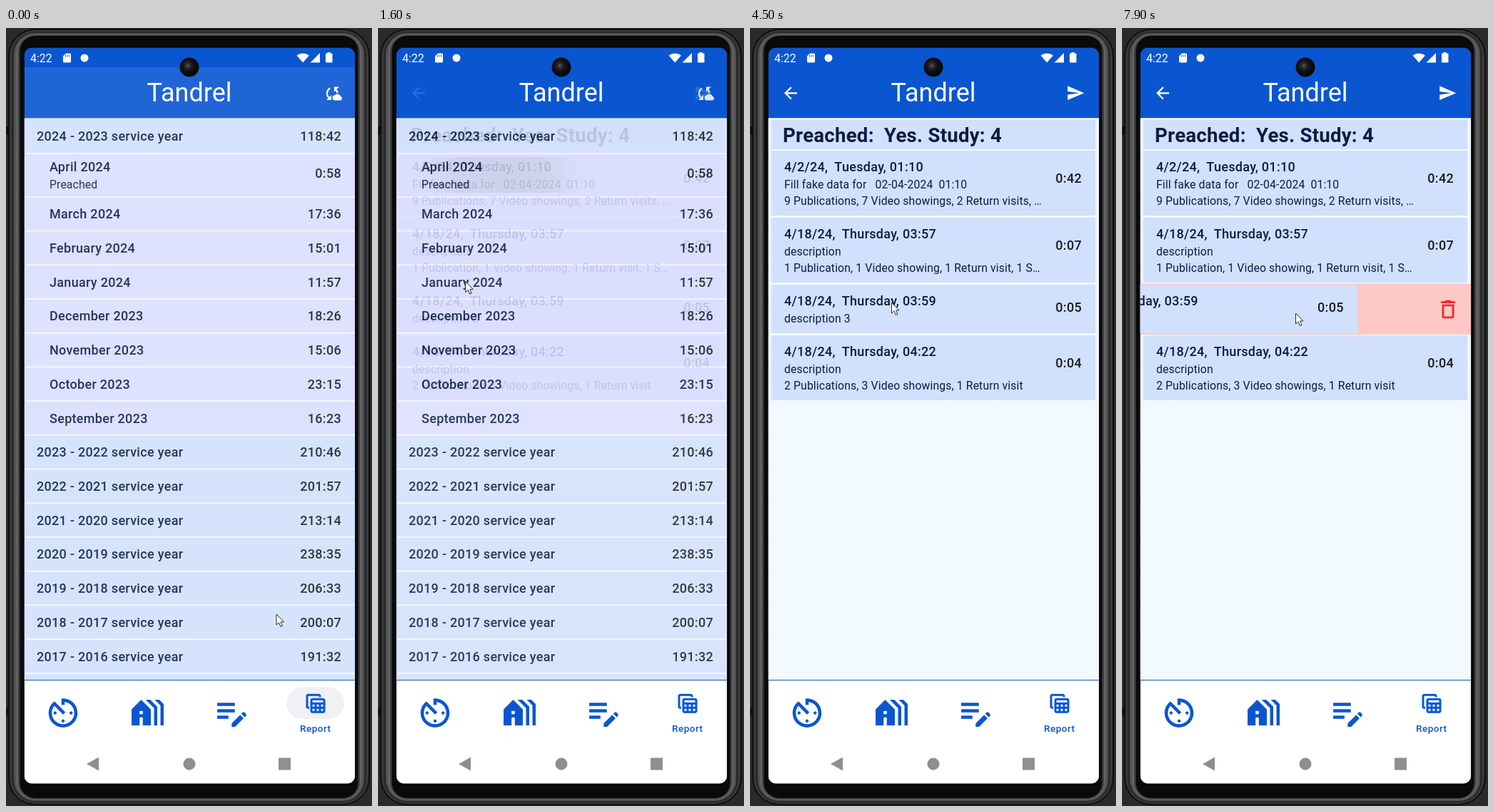
Animation of 513 by 1091 pixels, one loop 8000 ms. Source, as an HTML page:

```html
<!DOCTYPE html>
<html lang="en">
<head>
<meta charset="utf-8">
<title>Service report</title>
<style>
  html, body { margin: 0; width: 100%; height: 100%; overflow: hidden; background: #292a2c; }
  svg { display: block; width: 100vw; height: 100vh; }
  text { font-family: Roboto, sans-serif; white-space: pre; fill: #0b1b46; }
  .row { font-size: 18px; font-weight: 500; letter-spacing: .3px; }
  .num { text-anchor: end; fill: #191b22; }
  .small { font-size: 15.75px; letter-spacing: .13px; }
  .head { font-size: 27.6px; font-weight: 700; letter-spacing: .25px; }
  .white { fill: #fff; }
</style>
</head>
<body>
<svg id="stage" viewBox="0 0 513 1091" xmlns="http://www.w3.org/2000/svg"></svg>
<script>
const BLUE = '#0a56d1', PAPER = '#f2f9ff', CARD = '#d1e0fc', MONTH = '#dddeff', YEAR = '#d2e0fb';
const LOOP = 8000, STEP = 100;
const LEFT = 25.6, WIDTH = 463.6, LIST_TOP = 126.6;

const rect = (x, y, w, h, fill, more = '') =>
  `<rect x="${x}" y="${y}" width="${w}" height="${h}" fill="${fill}" ${more}/>`;
const band = (y, h, fill, more) => rect(LEFT, y, WIDTH, h, fill, more);
const text = (x, y, cls, s) => `<text x="${x}" y="${y}" class="${cls}">${s}</text>`;
const icon = (x, y, scale, fill, d, more = '') =>
  `<path transform="translate(${x} ${y}) scale(${scale})" fill="${fill}" d="${d}" ${more}/>`;

const TRASH = 'M6 19c0 1.1.9 2 2 2h8c1.1 0 2-.9 2-2V7H6v12zM8 9h8v10H8V9zm7.5-5l-1-1h-5l-1 1H5v2h14V4z';
const BACK = 'M20 11H7.83l5.59-5.59L12 4l-8 8 8 8 1.41-1.41L7.83 13H20v-2z';
const SEND = 'M2.01 21L23 12 2.01 3 2 10l15 2-15 2z';
const TIMER = 'M11 17c0 .55.45 1 1 1s1-.45 1-1-.45-1-1-1-1 .45-1 1zm0-14v4h2V5.08c3.39.49 6 3.39 6 6.92 0 3.87-3.13 7-7 7s-7-3.13-7-7c0-1.68.59-3.22 1.58-4.42L12 13l1.41-1.41-6.8-6.8v.02C4.42 6.45 3 9.05 3 12c0 4.97 4.02 9 9 9 4.97 0 9-4.03 9-9s-4.03-9-9-9h-1zm7 9c0-.55-.45-1-1-1s-1 .45-1 1 .45 1 1 1 1-.45 1-1zM6 12c0 .55.45 1 1 1s1-.45 1-1-.45-1-1-1-1 .45-1 1z';
const HOUSES = 'M18 20V8.35L13.65 4h-2.83L16 9.18V20zM22 20V6.69L19.31 4h-2.83L20 7.52V20zM8 4l-6 6v10h5v-5h2v5h5V10zM9 13H7v-2h2z';
const NOTE = 'M3 10h11v2H3v-2zm0-2h11V6H3v2zm0 8h7v-2H3v2zm15.01-3.13.71-.71a.996.996 0 0 1 1.41 0l.71.71c.39.39.39 1.02 0 1.41l-.71.71-2.12-2.12zm-.71.71-5.3 5.3V21h2.12l5.3-5.3-2.12-2.12z';
const TABLE = 'M19 7H9c-1.1 0-2 .9-2 2v10c0 1.1.9 2 2 2h10c1.1 0 2-.9 2-2V9c0-1.1-.9-2-2-2zm0 2v2H9V9h10zm-6 6v-2h2v2h-2zm2 2v2h-2v-2h2zm-4-2H9v-2h2v2zm6-2h2v2h-2v-2zm-8 4h2v2H9v-2zm8 2v-2h2v2h-2zM6 17H5c-1.1 0-2-.9-2-2V5c0-1.1.9-2 2-2h10c1.1 0 2 .9 2 2v1h-2V5H5v10h1v2z';

// Nested rounded shells: [inset x, inset y, colour], outermost first.
function phone() {
  const shells = [[3, 1, '#0f0f10'], [5, 3, '#39393a'], [8, 5, '#29292a'], [11, 7, '#525253'],
    [14, 9, '#626263'], [17, 10, '#3c3c3d'], [19.5, 11, '#0a0a0b']];
  return rect(0, 0, 513, 1091, '#292a2c') +
    rect(0, 138, 4, 12, '#111') + rect(0, 953, 4, 11, '#111') +
    shells.map(([x, y, fill]) =>
      rect(x, y, 513 - 2 * x, 1091 - 2 * y, fill, `rx="${41 - x}"`)).join('');
}

function topBar() {
  return band(27.5, 100, BLUE) +
    `<g fill="#fff">
      <text x="34" y="48" class="white" font-size="16">4:22</text>
      <path d="M84 35.5h5.5q1.5 0 1.5 1.5v10q0 1.5-1.5 1.5h-8q-1.5 0-1.5-1.5v-7.5z"/>
      <path d="M83.5 38v2.5m2.5-2.5v2.5m2.5-2.5v2.5" stroke="${BLUE}" stroke-width="1"/>
      <circle cx="110" cy="42" r="5.5"/>
      <path d="M407.5 38.5a14 14 0 0 1 17.5 0L416.2 48.5zM440 35v13.5h-13.5zM450.5 34h4v1.5h2q1 0 1 1v11q0 1-1 1h-7.5q-1 0-1-1v-11q0-1 1-1h1.5z"/>
      <text x="257" y="103" class="white" font-size="36" text-anchor="middle">Tandrel</text>
    </g>
    <g id="syncIcon" fill="#fff">
      <path d="M454 84.5a8.5 8.5 0 0 0-.5 14M460.5 85a8 8 0 0 1 4 6" fill="none" stroke="#fff" stroke-width="2.2"/>
      <path d="M449 101h7v-7zM460 82.5h7l-7 7z"/>
      <path d="M460.5 101.5a3.7 3.7 0 0 1 .3-7.3 5 5 0 0 1 8.5 1.9 2.8 2.8 0 0 1-.6 5.4z"/>
    </g>
    <g id="detailIcons">${icon(43.5, 77.8, 1.125, '#fff', BACK)}${icon(443, 78, 1.1, '#fff', SEND)}</g>`;
}

function yearList() {
  const months = ['March 2024', 'February 2024', 'January 2024', 'December 2023',
    'November 2023', 'October 2023', 'September 2023'];
  const totals = ['17:36', '15:01', '11:57', '18:26', '15:06', '23:15', '16:23',
    '210:46', '201:57', '213:14', '238:35', '206:33', '200:07', '191:32'];
  let out = band(LIST_TOP, 788, PAPER) + band(LIST_TOP, 48.4, YEAR) + band(177, 59, MONTH) +
    rect(61, 181, 229, 50, 'url(#rippleFill)', 'id="ripple"') +
    text(43, 158, 'row', '2024 - 2023 service year') + text(470, 158, 'row num', '118:42') +
    text(61, 201, 'row', 'April 2024') + text(61, 225, 'small', 'Preached') +
    text(470, 209.5, 'row num', '0:58');
  totals.forEach((total, i) => {
    const y = 237.8 + 47.72 * i, base = y + 29.4;
    const year = 2030 - i;
    out += band(y, 45.7, i < 7 ? MONTH : YEAR) +
      (i < 7 ? text(61, base, 'row', months[i])
             : text(43, base, 'row', `${year} - ${year - 1} service year`)) +
      text(470, base, 'row num', total);
  });
  return out + band(906, 8, YEAR);
}

const panel = (y, h) => rect(29.7, y, 454.6, h, CARD);

function card(y, h, title, lines, total, totalY) {
  return panel(y, h) + text(48, y + 29, 'row', title) +
    lines.map((s, i) => text(48, y + 53 + 23 * i, 'small', s)).join('') +
    text(465, totalY, 'row num', total);
}

function dayList() {
  return band(LIST_TOP, 788, PAPER) + panel(128.5, 41.5) +
    text(46, 159.5, 'head', 'Preached:  Yes. Study: 4') +
    card(172, 91, '4/2/24,  Tuesday, 01:10',
      ['Fill fake data for   02-04-2024  01:10', '9 Publications, 7 Video showings, 2 Return visits, …'], '0:42', 217) +
    card(266, 91, '4/18/24,  Thursday, 03:57',
      ['description', '1 Publication, 1 Video showing, 1 Return visit, 1 S…'], '0:07', 311) +
    `<g id="remove">${band(358.5, 71.5, '#fdc8c5')}${icon(440, 377.5, 1.42, '#ec2a2d', TRASH)}</g>
     <g id="ghostTrash">${icon(440, 377.5, 1.42, '#fff', TRASH, 'opacity=".6"')}</g>
     <g id="swipe">${card(360, 68, '4/18/24,  Thursday, 03:59', ['description 3'], '0:05', 398)}</g>` +
    card(431, 91, '4/18/24,  Thursday, 04:22',
      ['description', '2 Publications, 3 Video showings, 1 Return visit'], '0:04', 476);
}

function bottomBar() {
  return band(914, 146, '#fff') + band(914, 1, '#1a5ca8') +
    rect(393, 924, 81, 45, '#eff1f4', 'rx="22.5" id="pill"') +
    icon(53, 933.5, 2.25, BLUE, TIMER) + icon(171.5, 933, 2.25, BLUE, HOUSES) +
    icon(289.3, 932.7, 2.25, BLUE, NOTE) + icon(416, 929.3, 1.5, BLUE, TABLE) +
    `<text x="412" y="987" font-size="13.5" font-weight="500" letter-spacing=".5" style="fill:${BLUE}">Report</text>
     <g fill="#8f8f8f"><path d="M113 1032l17-9.5v19z"/><circle cx="257" cy="1032" r="8.5"/>
     <path d="M382 1023.5h17v17h-17z"/></g>`;
}

const stage = document.getElementById('stage');
stage.innerHTML = `<defs>
    <radialGradient id="rippleFill" gradientUnits="userSpaceOnUse" cx="170" cy="206" r="120">
      <stop offset="0" stop-color="#c1c5d8"/><stop offset=".5" stop-color="#c4c8da"/>
      <stop offset="1" stop-color="#c8cce0" stop-opacity="0"/>
    </radialGradient>
    <radialGradient id="lens" cx=".42" cy=".42">
      <stop offset="0" stop-color="#5a5d61"/><stop offset=".25" stop-color="#2a2b2e"/>
      <stop offset=".6" stop-color="#111"/><stop offset="1" stop-color="#080808"/>
    </radialGradient>
    <clipPath id="screen"><rect x="${LEFT}" y="27.5" width="${WIDTH}" height="1032" rx="11"/></clipPath>
  </defs>` + phone() +
  `<g clip-path="url(#screen)">${topBar()}<g>${yearList()}</g>
    <g id="days">${dayList()}</g>${bottomBar()}
    <g id="veil">${band(55, LIST_TOP - 55, '#fff', 'opacity=".09"')}${band(LIST_TOP, 787, '#e4f4ff', 'opacity=".12"')}</g>
  </g>
  <circle cx="257" cy="55" r="13.5" fill="url(#lens)"/>
  <path id="cursor" d="M0 0V15L3.5 11.8 5.9 17.5 8.4 16.5 6 10.9H10.5Z" fill="#fff" stroke="#26282e" stroke-width="1"/>`;

const part = id => document.getElementById(id);
const fade = (id, value) => part(id).setAttribute('opacity', value);
const clamp = v => Math.max(0, Math.min(1, v));
const ease = v => v * v * (3 - 2 * v);
const ramp = (t, from, to) => clamp((t - from) / (to - from));

// Linear track through [time, ...values] points.
function track(points, t) {
  const next = points.findIndex(p => p[0] > t);
  if (next < 1) return points[next ? points.length - 1 : 0].slice(1);
  const a = points[next - 1], b = points[next], k = (t - a[0]) / (b[0] - a[0]);
  return a.slice(1).map((v, i) => v + (b[i + 1] - v) * k);
}

const pointer = [
  [0, 379, 822], [100, 372, 800], [400, 265, 470], [600, 192, 265], [800, 170, 205], [1200, 168, 208],
  [1400, 147.5, 281], [1800, 98, 430], [2200, 80.5, 493], [2500, 140, 497], [2900, 262, 498],
  [3100, 319, 497], [3300, 319, 497], [3700, 284, 487], [3800, 284, 487],
  [4200, 215, 345], [4500, 198.5, 385], [4700, 198, 430], [5000, 250, 470], [5300, 375, 400],
  [5600, 345, 335], [6000, 333.5, 397], [6400, 366, 398], [6700, 350, 398],
  [6800, 262, 398], [6900, 152.5, 398], [7100, 92, 399], [7500, 92, 399], [7900, 243.5, 400]
];
const swipe = [
  [6600, 0], [6700, -15], [6800, -75], [6900, -184.7], [7000, -245], [7100, -262], [7500, -262], [7900, -154.3]
];

function draw(time) {
  const t = Math.floor(time / STEP) * STEP;
  const [x, y] = track(pointer, t);
  part('cursor').setAttribute('transform', `translate(${x} ${y})`);

  const shown = ease(ramp(t, 1450, 2100));
  fade('days', shown);
  fade('detailIcons', shown);
  fade('syncIcon', 1 - shown);
  fade('ripple', ramp(t, 1100, 1300) * (1 - ramp(t, 1450, 1800)));
  fade('pill', 1 - ramp(t, 0, 500));
  fade('veil', 1 - ramp(t, 0, 400));

  const [shift] = track(swipe, t);
  part('swipe').setAttribute('transform', `translate(${shift} 0)`);
  fade('remove', ramp(t, 6900, 7100));
  fade('ghostTrash', t >= 6800 && t < 7000 ? 1 : 0);
}

const start = performance.now();
function tick() {
  draw((performance.now() - start) % LOOP);
  requestAnimationFrame(tick);
}
tick();
</script>
</body>
</html>
```
